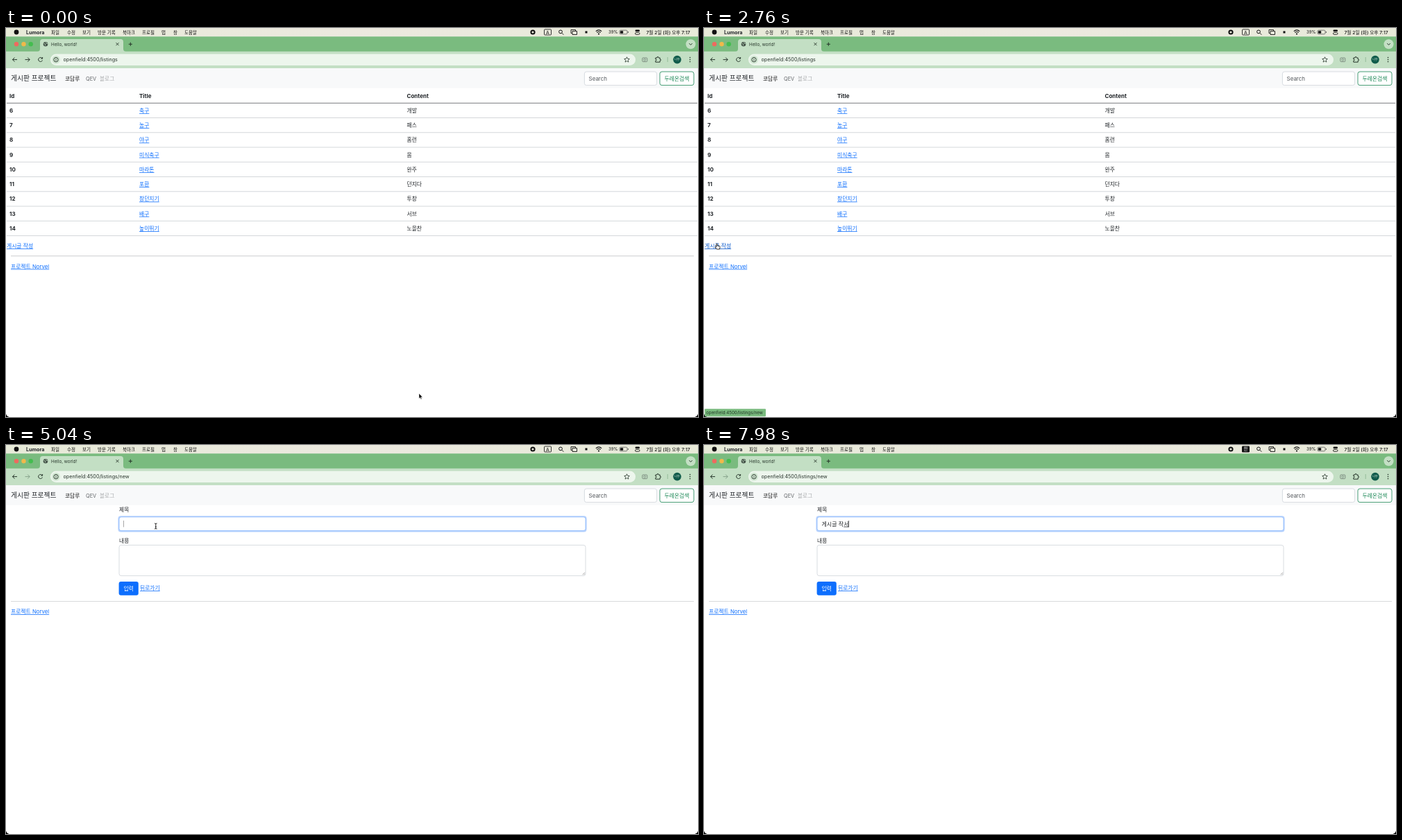
Recreate the animation shown at these times as an HTML page. Size 997 by 561 pixels, loop 8000 ms.

```html
<!DOCTYPE html>
<html lang="ko">
<head>
<meta charset="utf-8">
<style>
html, body { margin: 0; width: 100%; height: 100%; overflow: hidden; background: #fff; }
svg { display: block; }
text { font-family: Inter, "Noto Sans CJK KR", sans-serif; white-space: pre; }
.link { text-decoration: underline; }
.compose { text-decoration: underline; }
</style>
</head>
<body>
<svg id="stage" width="997" height="561" viewBox="0 0 997 561"></svg>
<script>
const INK = '#212529', BLUE = '#0d6efd', STRIP = '#7abb7f', BAR = '#c3dfc4';
const HOST = 'openfield:4500/listings';

const text = (x, y, s, size = 7.9, fill = INK, extra = '') =>
  `<text x="${x}" y="${y}" font-size="${size}" fill="${fill}" ${extra}>${s}</text>`;
const bold = (x, y, s, size = 8) => text(x, y, s, size, INK, 'font-weight="700"');
const link = (x, y, s, extra = '') => text(x, y, s, 7.8, BLUE, 'class="link" ' + extra);
const rect = (x, y, w, h, fill, r = 0, extra = '') =>
  `<rect x="${x}" y="${y}" width="${w}" height="${h}" rx="${r}" fill="${fill}" ${extra}/>`;
const box = (x, y, w, h, stroke, r = 3, extra = '') =>
  rect(x, y, w, h, '#fff', r, `stroke="${stroke}" stroke-width=".8" ${extra}`);
const dot = (x, y, r, fill, extra = '') => `<circle cx="${x}" cy="${y}" r="${r}" fill="${fill}" ${extra}/>`;
const line = (d, stroke = '#26352a', w = 1, extra = '') =>
  `<path d="${d}" fill="none" stroke="${stroke}" stroke-width="${w}" ${extra}/>`;
const rule = (x, y, x2, color) => line(`M${x} ${y}H${x2}`, color, .9);
const group = (id, body) => `<g id="${id}">${body}</g>`;

function menuBar() {
  const menus = [[65, '파일'], [88, '수정'], [110, '보기'], [132, '방문 기록'], [168, '북마크'],
    [196, '프로필'], [224, '탭'], [241, '창'], [257, '도움말']];
  return rect(0, 0, 997, 12.5, 'url(#sky)') + dot(15, 6, 3.4, '#111') +
    bold(29, 8.6, 'Lumora', 7.2) +
    menus.map(([x, s]) => text(x, 8.5, s, 6.5, '#111', 'font-weight="500"')).join('') +
    dot(759, 6, 2.6, 'none', 'stroke="#111" stroke-width="2"') +
    group('latin', rect(775.5, 2, 10, 8, 'none', 1, 'stroke="#222" stroke-width=".9"') +
      text(778, 8.5, 'A', 6.8, '#111')) +
    group('hangul', rect(775, 1.6, 11, 8.8, '#111', 1.2) + text(777.5, 8.4, '한', 6.4, '#fff')) +
    dot(799, 5.4, 2.4, 'none', 'stroke="#111"') + line('M801 7.4l2.3 2.3', '#111') +
    line('M815.5 7.5H814V2.5H820.5V4M816 4.5H822.5V9.5H816Z', '#111', .9) +
    rect(834.5, 4.5, 3, 3, '#111') +
    line('M849.8 4.8Q854 1 858.2 4.8M851.3 6.6Q854 4.3 856.7 6.6', '#111', 1.1) + dot(854, 8.6, 1.1, '#111') +
    text(868, 8.4, '39%', 6.1, '#111') +
    rect(884, 3.2, 11, 5.6, 'none', 1.5, 'stroke="#555" stroke-width=".8"') +
    rect(885, 4.2, 4.2, 3.6, '#111', .7) + rect(895.8, 5, 1, 2, '#555') +
    rect(906.5, 2.5, 6.5, 2.8, '#111', 1.4) + rect(906.5, 6.6, 6.5, 2.8, 'none', 1.4, 'stroke="#111" stroke-width=".8"') +
    text(922.5, 8.5, '7월 2일 (화) 오후 7:17', 6.7, '#111', 'font-weight="500"');
}

function browserChrome() {
  return rect(0, 12.3, 997, 22, STRIP) + rect(0, 33.8, 997, 24.2, BAR) +
    dot(15, 23.2, 3.2, '#ee6a5f') + dot(25.5, 23.2, 3.2, '#f0b94a') + dot(35.7, 23.2, 3.2, '#43bd4f') +
    `<path d="M45 34Q49 34 49 30V20Q49 16 53 16H165Q169 16 169 20V30Q169 34 173 34Z" fill="${BAR}"/>` +
    dot(57, 23.2, 3.3, '#46554a') + line('M54.5 22l2 1.2v2M57.5 20.5l.5 1.6 2 .4', BAR, .8) +
    text(65, 25.5, 'Hello, world!', 6.3, '#26352a') +
    line('M158.5 21.2l4 4m0-4l-4 4', '#26352a', .9) + line('M176.7 23.3h5.2m-2.6-2.6v5.2') +
    dot(986.5, 23.2, 7, BAR) + line('M984.3 22.2l2.2 2.2 2.2-2.2') +
    line('M16 45.6H9.5M12.4 42.6l-3 3 3 3') +
    line('M27.5 45.6H34M31.2 42.6l3 3-3 3', '#26352a', 1, 'id="forward"') +
    line('M52 43.6A3 3 0 1 0 52.5 46.5M52.6 42v2.2h-2.2') +
    rect(64, 37.5, 843, 16.5, '#edf6ed', 8.2) + dot(72, 45.7, 6, '#d3e8d4') +
    dot(72, 45.7, 3.2, 'none', 'stroke="#26352a" stroke-width=".9"') + line('M72 45.3v2M72 43.6v.8', '#26352a', .9) +
    text(82.5, 48.3, HOST, 7.2, '#27332b', 'id="url"') +
    line('M894.5 41.8l1.1 2.5 2.7.3-2 1.8.6 2.7-2.4-1.4-2.4 1.4.6-2.7-2-1.8 2.7-.3Z', '#26352a', .8) +
    rect(916.8, 43, 7, 5.6, 'none', 1, 'stroke="#75857a" stroke-width=".9"') +
    dot(920.3, 45.8, 1.4, 'none', 'stroke="#75857a" stroke-width=".8"') +
    line('M935.8 43h2.2q0-1.6 1.1-1.6t1.1 1.6h2v2.1q1.4 0 1.4 1t-1.4 1v2.1h-6.4v-2q1.4-.2 1.4-1.1t-1.4-1.1Z') +
    line('M953.2 42v7', '#8fb894', .9) + dot(967, 45.6, 5.8, '#105b4b') + text(963.3, 47.4, '나무', 4, '#dff0e2') +
    [42.6, 45.6, 48.6].map(y => dot(985.5, y, .8, '#26352a')).join('');
}

function navbar() {
  return rect(0, 58, 997, 28.7, '#f8f9fa') + text(7, 76, '게시판 프로젝트', 9.75) +
    text(85, 75.6, '코담루', 7.7, '#111') + text(115, 75.6, 'QEV', 7.4, '#65686b') + text(135, 75.6, '블로그', 7.7, '#aaacae') +
    box(833.4, 63, 104.2, 19.6, '#ced4da') + text(839.5, 75.6, 'Search', 8, '#55595d') +
    box(942, 63, 49, 19.6, '#198754') + text(948.5, 75.7, '두레온검색', 7.8, '#198754');
}

function listPage() {
  const rows = [['축구', '개발'], ['농구', '패스'], ['야구', '홈런'], ['미식축구', '몸'], ['마라톤', '완주'],
    ['포환', '던지다'], ['창던지기', '투창'], ['배구', '서브'], ['높이뛰기', '노을찬']];
  return bold(5, 100.8, 'Id') + bold(192, 100.8, 'Title') + bold(577.5, 100.8, 'Content') + rule(1, 108.3, 996, '#6b6e71') +
    rows.map(([title, content], i) => {
      const y = 121.9 + 21.26 * i;
      return bold(5, y, i + 6) + link(192, y, title) + text(577.5, y, content, 7.8) + rule(1, y + 7.6, 996, '#d0d3d6');
    }).join('') +
    link(1, 317.2, '게시글 작성', 'id="write"') + rule(7, 328.8, 991, '#c6c7c9') + link(7, 346.6, '프로젝트 Norvel');
}

function formPage() {
  return text(163, 96, '제목', 7.8) + rect(161.4, 102.2, 675.2, 23.2, '#b9d3fd', 4, 'id="ring"') +
    box(163, 103.8, 672, 19.8, '#ced4da', 3, 'id="field"') +
    text(169.5, 116.6, '<tspan id="done"></tspan><tspan id="compose" class="compose"></tspan>', 8, INK, 'id="typed"') +
    rect(0, 109, .8, 9.4, '#222', 0, 'id="caret"') +
    text(163, 140.7, '내용', 7.8) + box(163, 144.4, 672, 44.2, '#ced4da') +
    line('M830.5 187.2l3.5-3.5M832.5 187.2l1.5-1.5', '#777', .6) +
    rect(162.6, 197, 28.2, 19.8, BLUE, 3) + text(169.4, 209.8, '입력', 7.8, '#fff') +
    link(193, 209, '뒤로가기') + rule(7, 225.5, 991, '#d5d6d8') + link(7, 243.2, '프로젝트 Norvel');
}

const corners = '<path d="M0 556.5V561H4.5Q1 560 0 556.5ZM997 556.5V561H992.5Q996 560 997 556.5Z" fill="#000"/>';
const status = rect(1, 549.3, 88, 11, STRIP, 1) + text(3, 557, HOST + '/new', 6.2, '#1f3524');
const pointers = group('arrow', '<path d="M0 0V7.4L1.7 5.9 2.8 8.5 4 8 2.9 5.4H5.2Z" fill="#000" stroke="#fff" stroke-width=".5"/>') +
  group('hand', '<path d="M-.7 .5Q0-.4.7.5V3L4 3.7Q4.8 4 4.6 5L3.9 8H-.2L-2.7 4.8Q-2.3 3.7-.7 5Z" fill="#fff" stroke="#000" stroke-width=".8"/>') +
  group('beam', line('M-1.8-4Q0-4 0-3Q0-4 1.8-4M0-3V3M-1.8 4Q0 4 0 3Q0 4 1.8 4M-1 1H1', '#111', .9));

const $ = id => document.getElementById(id);
$('stage').innerHTML =
  '<defs><linearGradient id="sky"><stop stop-color="#e7ead8"/><stop offset=".5" stop-color="#ece9df"/><stop offset="1" stop-color="#e8ead9"/></linearGradient></defs>' +
  rect(0, 0, 997, 561, '#fff') + menuBar() + browserChrome() + navbar() +
  group('list', listPage()) + group('form', formPage()) + corners + group('status', status) + group('pointer', pointers);

const LOOP = 8000, OPEN = 2790, FOCUS = 4520, SWITCH = 5880, TYPE = 6360, KEY = 130;
const strokes = ['ㄱ', '게', '겟', '게시', '게식', '게시그', '게시글', '게시글 ', '게시글 ㅈ',
  '게시글 자', '게시글 작', '게시글 작ㅅ', '게시글 작서'];
// Pointer stops: time, x, y
const path = [[0, 595, 527], [870, 595, 527], [1620, 18.5, 311], [3060, 18.5, 311],
  [3360, 204, 136], [3600, 215.8, 117], [LOOP, 215.8, 117]];

const ramp = (t, from, to) => Math.min(1, Math.max(0, (t - from) / (to - from)));
const show = (id, on) => $(id).style.display = on ? '' : 'none';
const fade = (id, v) => $(id).setAttribute('opacity', v);

function pointerAt(t) {
  const i = path.findIndex(p => t < p[0]);
  const [a, b] = [path[i - 1], path[i]];
  const k = ramp(t, a[0], b[0]), e = k * k * (3 - 2 * k);
  return [a[1] + (b[1] - a[1]) * e, a[2] + (b[2] - a[2]) * e];
}

function draw(t) {
  const opened = t >= OPEN, typing = t >= TYPE, hover = t >= 1590 && !opened;
  show('list', !opened);
  show('form', opened);
  $('url').textContent = HOST + (opened ? '/new' : '');
  $('forward').setAttribute('stroke', opened ? '#86a38b' : '#26352a');
  $('write').setAttribute('fill', hover ? '#0a58ca' : BLUE);
  fade('status', ramp(t, 1590, 1665) * (1 - ramp(t, 3060, 3200)));
  show('latin', t < SWITCH);
  show('hangul', t >= SWITCH);

  const [x, y] = pointerAt(t);
  const beam = opened && y < 124;
  $('pointer').setAttribute('transform', `translate(${x} ${y})`);
  show('pointer', !typing);
  show('hand', hover);
  show('beam', beam);
  show('arrow', !hover && !beam);

  const focus = ramp(t, FOCUS, FOCUS + 150);
  fade('ring', focus);
  $('field').setAttribute('stroke', focus > .5 ? '#86b7fe' : '#ced4da');

  const word = typing ? strokes[Math.min(strokes.length - 1, Math.floor((t - TYPE) / KEY))] : '';
  const split = word.endsWith(' ') ? word.length : Math.max(0, word.length - 1);
  $('done').textContent = word.slice(0, split);
  $('compose').textContent = word.slice(split);
  $('caret').setAttribute('x', 169.2 + (word ? $('typed').getComputedTextLength() : 0));
  const phase = (t - FOCUS) % 1000;
  const blink = 1 - ramp(phase, 470, 570) + ramp(phase, 950, 1000);
  fade('caret', t < FOCUS ? 0 : typing ? .8 : blink);
}

const start = performance.now();
function tick() {
  draw((performance.now() - start) % LOOP);
  requestAnimationFrame(tick);
}
tick();
</script>
</body>
</html>
```
